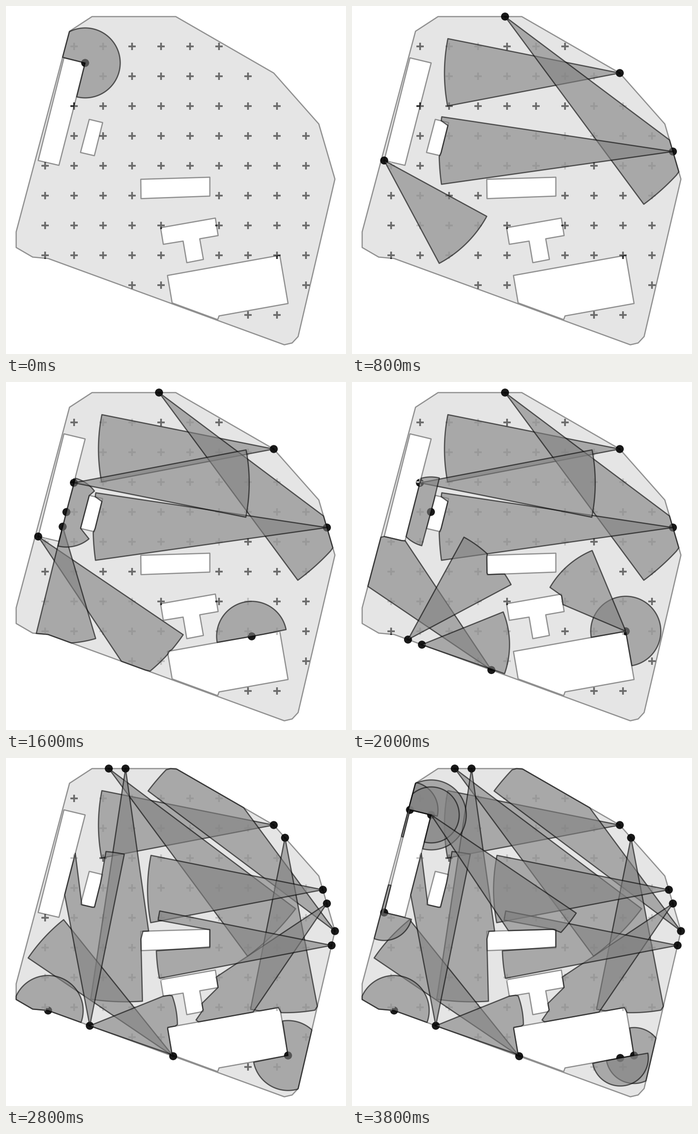
Recreate the animation shown at these times as a matplotlib script. Size 739 by 758 pixels, loop 4000 ms.

```python
import numpy as np
import matplotlib.pyplot as plt
from matplotlib.animation import FuncAnimation
from matplotlib.patches import Circle, PathPatch, Polygon
from matplotlib.path import Path

W, H, DPI = 739, 758, 100
FRAMES, INTERVAL = 20, 200
PX = 72 / DPI
UNIT = 127            # pixels per unit of reach
SPREAD = 66.6         # field of view in degrees at reach 1
SKEW = 0.25           # small clockwise turn of every heading
SPACING = 30.4        # least distance between mounting points on a wall

REACH = dict(tele=4, long=3, mid=2, short=1.5, wide=1, dome=0.6, mini=0.48)
HEADING = {d: 45 * i for i, d in
           enumerate(["E", "SE", "S", "SW", "W", "NW", "N", "NE"])}

# Walls of the yard and of the buildings in it
SITE = np.array([(22, 492), (138, 55), (187, 23), (369, 23), (582, 146),
                 (680, 257), (715, 377), (635, 720), (622, 734), (605, 738),
                 (91.5, 550), (58, 547), (22, 526)], float)
SHED = np.array([(126, 113), (172, 124), (115, 347), (70, 336.5)])
HUT = np.array([(181, 247), (210, 254), (192, 326), (162, 319)], float)
BAR = np.array([(293, 377.5), (443, 373), (443, 414), (293.5, 419.5)])
TEE = np.array([(336, 483), (455, 462), (461, 500), (421, 507),
                (429, 552), (393, 559), (385, 512), (342, 519)], float)
HALL = np.array([(351, 587), (595, 543), (613, 648), (463, 675),
                 (460, 683), (361.2, 646.7)])
BLOCKS = [SHED, HUT, BAR, TEE, HALL]
RINGS = [SITE] + BLOCKS
START = np.vstack(RINGS)
SIDE = np.vstack([np.roll(r, -1, axis=0) - r for r in RINGS])


def mounts(a, b):
    """Evenly spaced mounting points from corner a to corner b."""
    n = int(np.hypot(*(b - a)) / SPACING)
    return [a + (b - a) * i / n for i in range(n + 1)]


top = mounts(SITE[2], SITE[3])
slope = mounts(SITE[4], SITE[5])
east = mounts(SITE[5], SITE[6])
flank = mounts(SITE[6], SITE[7])
south = mounts(SITE[10], SITE[9])
shed = mounts(SHED[1], SHED[2])
hut = mounts(HUT[3], HUT[0])
bar = mounts(BAR[2], BAR[3])
hall = mounts(HALL[1], HALL[0])
dock = mounts(HALL[2], HALL[3])

# Cameras that stay to the end, by the step at which they appear
KEPT = {
    4: [(slope[0], "long", "W")],
    12: [(top[1], "tele", "SE"), (top[2], "tele", "S"),
         (flank[0], "tele", "NW"), (slope[1], "long", "S"),
         (east[1], "long", "W"), (east[2], "long", "SW"),
         (south[9], "long", "NW"), (south[0], "dome")],
    13: [(south[3], "short", "E")],
    14: [(south[3], "long", "N"), (flank[1], "long", "W")],
    17: [(p, "mini") for p in dock[:2]],
    18: [(shed[0], "dome")],
    19: [(p, "mini") for p in (SHED[0], SHED[1], SHED[3])]
        + [(shed[0], "long", "SE")],
}
# Cameras that are tried and dropped: (first step, end step)
TRIED = {
    (0, 1): [(shed[0], "dome")],
    (1, 3): [(east[3], "tele", "W")],
    (2, 3): [(hall[2], "dome"), (shed[-1], "dome")],
    (3, 4): [(SHED[3], "long", "SE")],
    (3, 12): [(top[4], "tele", "SE")],
    (4, 5): [(SHED[3], "mid", "SE")],
    (4, 12): [(east[2], "tele", "W")],
    (5, 6): [(south[1], "long", "N")],
    (5, 10): [(SHED[3], "long", "SE")],
    (6, 7): [(hall[2], "dome")],
    (7, 8): [(TEE[4], "short", "E")],
    (7, 9): [(shed[6], "mid", "S")],
    (7, 10): [(shed[5], "dome")],
    (8, 9): [(hall[2], "dome"), (shed[3], "long", "E")],
    (9, 10): [(shed[0], "long", "SE")],
    (9, 12): [(hall[0], "dome"), (hall[0], "short", "NW")],
    (10, 11): [(south[7], "long", "NW"), (south[2], "short", "E")],
    (10, 12): [(shed[3], "long", "E"), (hut[1], "dome"),
               (south[1], "mid", "NE")],
    (11, 12): [(hall[0], "mini"), (shed[0], "dome")],
    (12, 13): [(bar[3], "short", "S")],
    (12, 14): [(south[1], "long", "N")],
    (14, 17): [(dock[0], "dome")],
    (15, 16): [(shed[0], "short", "NW")],
    (16, 17): [(shed[0], "wide", "NW"), (shed[-1], "mid", "W")],
}


def is_free(pts):
    ok = Path(SITE).contains_points(pts)
    for b in BLOCKS:
        ok &= ~Path(b).contains_points(pts)
    return ok


def polar(deg):
    a = np.radians(deg)
    return np.column_stack([np.cos(a), np.sin(a)])


def nudge(p):
    """Step off the wall into open ground."""
    d = polar(np.arange(0, 360, 5))
    m = d[is_free(p + 0.4 * d)].sum(0)
    return p + 0.1 * m / max(np.hypot(*m), 1e-9)


def view(p, lens, heading=None):
    """Region seen from p: a fan of rays about one degree apart."""
    reach = REACH[lens]
    fov = SPREAD / reach if heading else 360
    mid = HEADING[heading] + SKEW if heading else 0
    d = polar(mid + np.linspace(-fov / 2, fov / 2, round(fov) + 1))
    eye = nudge(p)
    q = START - eye
    cross = d[:, :1] * SIDE[:, 1] - d[:, 1:] * SIDE[:, 0]
    cross[abs(cross) < 1e-12] = 1e-12
    dist = (q[:, 0] * SIDE[:, 1] - q[:, 1] * SIDE[:, 0]) / cross
    u = (q[:, 0] * d[:, 1:] - q[:, 1] * d[:, :1]) / cross
    hit = (dist > 0) & (u >= -1e-9) & (u <= 1 + 1e-9)
    dist = np.where(hit, dist, np.inf).min(1)
    edge = eye + np.minimum(dist, reach * UNIT)[:, None] * d
    return np.vstack([eye, edge]) if heading else edge


PLAN = {(a, FRAMES): cams for a, cams in KEPT.items()} | TRIED
CAMERAS = [(cam[0], view(*cam), a, b)
           for (a, b), cams in PLAN.items() for cam in cams]

gx, gy = np.meshgrid(85.2 + 62.97 * np.arange(10), 87.8 + 65 * np.arange(10))
GRID = np.column_stack([gx.ravel(), gy.ravel()])
GRID = GRID[is_free(GRID)]
NEAR = 0.4 * polar(np.arange(0, 360, 45))

fig = plt.figure(figsize=(W / DPI, H / DPI), dpi=DPI, facecolor="white")
ax = fig.add_axes([0, 0, 1, 1])
ax.set_xlim(0, W)
ax.set_ylim(H, 0)
ax.axis("off")

plus = dict(ls="", marker="+", ms=15.5 * PX, mew=3.8 * PX)
open_marks, = ax.plot([], [], color="#333333", zorder=1, **plus)
seen_marks, = ax.plot([], [], color="silver", zorder=4, **plus)

rings = [SITE] + [b[::-1] for b in BLOCKS]
ground = Path.make_compound_path(
    *[Path(np.vstack([r, r[:1]]), closed=True) for r in rings])
ax.add_patch(PathPatch(ground, fc="silver", ec="black", alpha=0.4,
                       lw=2.6 * PX, joinstyle="round", zorder=2))

layer = []


def draw(i):
    while layer:
        layer.pop().remove()
    seen = np.zeros(len(GRID), bool)
    spots = set()
    for p, area, first, end in CAMERAS:
        if not first <= i < end:
            continue
        for off in NEAR:
            seen |= Path(area).contains_points(GRID + off)
        spots.add(tuple(p))
        layer.append(ax.add_patch(Polygon(
            area, fc="gray", ec="black", alpha=0.6, lw=2.6 * PX,
            joinstyle="round", zorder=5)))
    for p in spots:
        layer.append(ax.add_patch(Circle(p, 8.7, fc="black", ec="none",
                                         alpha=0.9, zorder=3)))
    open_marks.set_data(*GRID[~seen].T)
    seen_marks.set_data(*GRID[seen].T)
    return layer


anim = FuncAnimation(fig, draw, frames=FRAMES, interval=INTERVAL,
                     repeat=True, repeat_delay=0, blit=False)
plt.show()
```
